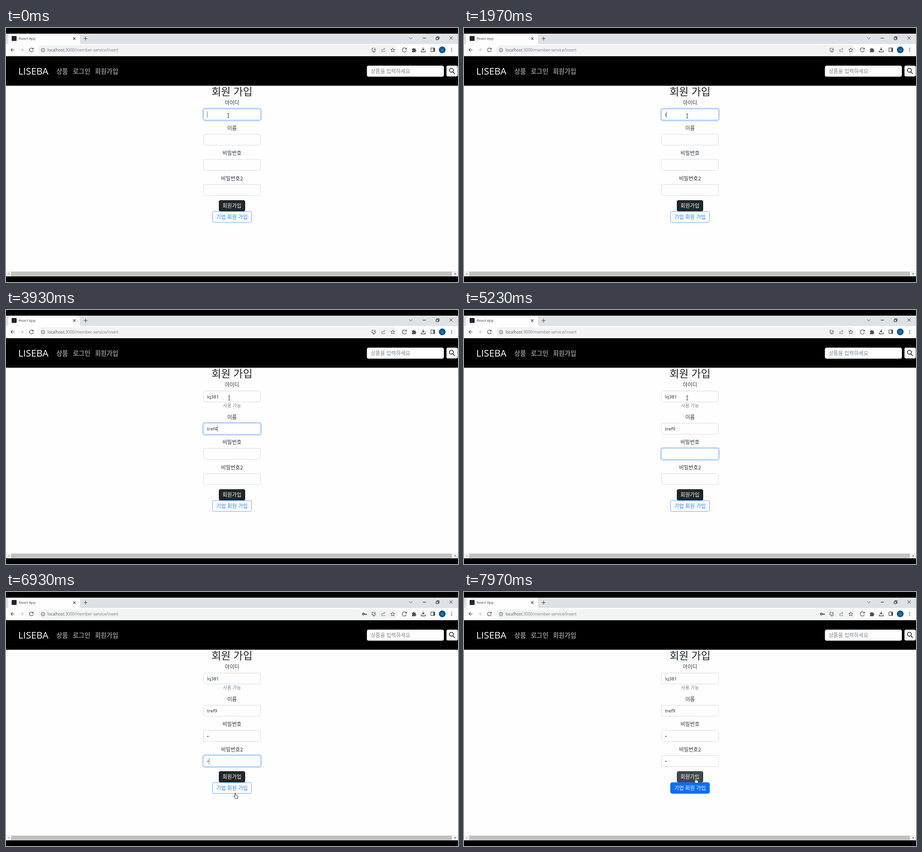
Write an HTML page that moves like this. It is 960 px wide and 540 px high and loops after 8000 ms.

```html
<!DOCTYPE html>
<html lang="ko">
<head>
<meta charset="utf-8">
<title>Sign-up form</title>
<style>
  html, body { margin: 0; width: 100%; height: 100%; overflow: hidden; background: #000; }
  svg { display: block; width: 960px; height: 540px; }
  text { font-family: "Open Sans", "Noto Sans CJK KR", "Noto Sans CJK", sans-serif; white-space: pre; }
  .ko { font-family: "Noto Sans CJK KR", "Noto Sans CJK", sans-serif; }
  .mid { text-anchor: middle; }
  .label { font-size: 11px; fill: #30343a; }
  .value { font-size: 9.8px; fill: #212529; }
  .nav { font-size: 13.4px; font-weight: 700; fill: #8c8c8c; }
  .icon { fill: none; stroke: #4d5054; stroke-width: 1.2; }
  .solid { fill: #4d5054; }
</style>
</head>
<body>
<svg viewBox="0 0 960 540">
  <rect width="960" height="540" fill="#000"/>

  <!-- tab strip -->
  <rect y="12" width="960" height="22" fill="#dee1e6"/>
  <path d="M2 34Q5 34 5 30V17Q5 12 10 12H152Q157 12 157 17V30Q157 34 160 34Z" fill="#fefefe"/>
  <rect x="12" y="17" width="10.5" height="10.5" rx="1" fill="#20252a"/>
  <text x="27" y="25" font-size="7.7" fill="#45484c">React App</text>
  <g class="icon">
    <path d="M142.500 20l5 5m0-5l-5 5M165 22.500h8m-4-4v8"/>
    <path d="M856 20l3.500 3.500 3.500-3.500" stroke-width="1"/>
    <path d="M885 21.500h7M913.500 20h4.800v4.800h-4.800zM915 20v-1.500h5v5h-1.500M942 18l6.500 6.500m0-6.500l-6.500 6.500" stroke="#202124" stroke-width="1"/>
  </g>

  <!-- toolbar -->
  <rect y="34" width="960" height="26" fill="#fefefe"/>
  <rect x="68" y="36.500" width="764" height="20" rx="10" fill="#f1f3f4"/>
  <g class="icon">
    <path d="M18 46.500h-7.500m3.500-3.500l-3.500 3.500 3.500 3.500"/>
    <path d="M29.500 46.500h7.500m-3.500-3.500l3.500 3.500-3.500 3.500" stroke="#c6c8ca"/>
    <path d="M57 44a4 4 0 1 0 .8 3.500M58 42v3h-3"/>
    <circle cx="78.500" cy="47" r="3.800" stroke-width="1"/>
    <path d="M78.500 46.300v2.700m0-4.200v.9" stroke-width="1"/>
    <path d="M781 43h-3.500v6h7.500v-1.500M779 51h4.500M783.500 42v4.500m-2-1.800l2 2 2-2" stroke-width="1"/>
    <path d="M798 45v5.500h6.500v-2M799.500 48q.5-3.500 4.500-3.500m-1.500-2.500l2.800 2.500-2.800 2.500" stroke="#85888c" stroke-width="1"/>
    <path d="M821.500 42.500l1.300 2.900 3 .3-2.300 2 .7 3-2.700-1.600-2.700 1.600.7-3-2.300-2 3-.3z" stroke-width="1"/>
    <path d="M850 44.500a4.500 4.500 0 1 0 .4 3.500M850.500 42v3h-3"/>
    <path d="M886 41.500v5.500m-2.500-2.300l2.500 2.500 2.500-2.500M882 47.500v3.300h8.500v-3.300" stroke-width="1.400"/>
    <rect x="902.500" y="42.500" width="8" height="7.500"/>
  </g>
  <g class="solid">
    <path d="M862 44h2.500a1.500 1.500 0 0 1 3 0h2.500v2.500a1.500 1.500 0 0 1 0 3v2h-8v-2.300a1.500 1.500 0 0 0 0-2.900z"/>
    <rect x="907.500" y="42.500" width="3" height="7.500"/>
    <circle cx="946.500" cy="43.300" r="1"/><circle cx="946.500" cy="46.600" r="1"/><circle cx="946.500" cy="49.900" r="1"/>
  </g>
  <g id="key" class="icon">
    <circle cx="759" cy="46.800" r="1.900" stroke-width="1.700"/>
    <path d="M761 46.800h5m-1.200 0v2" stroke-width="1.700"/>
  </g>
  <circle cx="926.500" cy="46.500" r="7.200" fill="#0c5590"/>
  <text class="ko mid" x="926.500" y="48.600" font-size="5.500" fill="#dfe9f2">나</text>
  <text x="88" y="50" font-size="8.530" fill="#7a7d82"><tspan fill="#55585c">localhost</tspan>:3000/member-service/insert</text>

  <!-- site header -->
  <rect y="122.700" width="960" height="394.300" fill="#fefefe"/>
  <text x="26" y="99" font-size="20.300" fill="#fefefe">LISEBA</text>
  <g class="nav">
    <text class="ko" x="107" y="96.500">상품</text>
    <text class="ko" x="142" y="96.500">로그인</text>
    <text class="ko" x="189" y="96.500">회원가입</text>
  </g>
  <rect x="766.500" y="80" width="163.500" height="23.500" rx="4" fill="#fefefe"/>
  <text class="ko" x="774.500" y="95.700" font-size="11" fill="#7b8288">상품을 입력하세요</text>
  <rect x="935.500" y="80" width="24" height="23" rx="3" fill="#fefefe"/>
  <g fill="none" stroke="#111" stroke-width="1.400"><circle cx="946" cy="89.800" r="4.200"/><path d="M949 93l4 4.500"/></g>

  <!-- horizontal scrollbar -->
  <rect y="517" width="960" height="11" fill="#f1f1f1"/>
  <rect x="11" y="518" width="936" height="9.500" fill="#c1c1c1"/>
  <path d="M7 520.500v4l-2.500-2z" fill="#a3a3a3"/>
  <path d="M953 520.500v4l2.500-2z" fill="#505050"/>

  <!-- form -->
  <text class="ko mid" x="480" y="143" font-size="22" fill="#212529">회원 가입</text>
  <text class="ko mid" id="hint" x="480" y="206.700" font-size="9.700" fill="#7b8288">사용 가능</text>
  <g id="first"></g>
  <g id="rest">
    <rect id="dark" x="452" y="366" width="56" height="24" rx="4"/>
    <text class="ko mid" x="480" y="382" font-size="11" fill="#fefefe">회원가입</text>
    <rect id="blue" x="438.400" y="390" width="83.200" height="23.300" rx="4" stroke-width=".8"/>
    <text class="ko mid" id="blueText" x="480" y="405.800" font-size="11">기업 회원 가입</text>
  </g>

  <!-- pointers -->
  <g id="pointer">
    <path id="beam" d="M-2-4.500H-.6L0-4 .6-4.500H2M0-4V4M-2 4.500H-.6L0 4 .6 4.500H2" fill="none" stroke="#333"/>
    <path id="arrow" d="M0 0V11l2.500-2.400 1.600 3.700 1.700-.7-1.600-3.600h3.500z" fill="#fff" stroke="#111" stroke-width=".8"/>
    <path id="hand" d="M-1 1a1 1 0 0 1 2 0v3.800l3.800 1q1.200.4 1 1.700l-.8 4H0L-3 7.200q-.2-1.700 2 0z" fill="#fff" stroke="#222" stroke-width=".9"/>
  </g>
</svg>
<script>
const LOOP = 8000, FADE = 150, BLINK = 530, SHIFT = 15, SHIFT_AT = 2770;
const WHITE = [254, 254, 254], BLUE = [13, 110, 253];
const $ = id => document.getElementById(id);

function add(parent, tag, attrs, text = "") {
  const node = document.createElementNS("http://www.w3.org/2000/svg", tag);
  for (const k in attrs) node.setAttribute(k, attrs[k]);
  node.textContent = text;
  parent.append(node);
  return node;
}

// keys: [time, value] pairs; on/off: focus interval
const fields = [
  { label: "아이디", y: 172, on: -1000, off: 2700,
    keys: [[1970, "l"], [2130, "lq"], [2270, "lq3"], [2400, "lq38"], [2530, "lq381"]] },
  { label: "이름", y: 225.500, on: 2700, off: 4700,
    keys: [[2960, "t"], [3100, "tr"], [3230, "tre"], [3370, "tref"], [3530, "tref4"], [4030, "tref"], [4230, "tref9"]] },
  { label: "비밀번호", y: 279, on: 4700, off: 5670, keys: [[5570, "•"]] },
  { label: "비밀번호2", y: 332.500, on: 5670, off: 7400, keys: [[5800, "•"]] }
];

fields.forEach((f, i) => {
  const g = $(i ? "rest" : "first");
  add(g, "text", { class: "ko mid label", x: 480, y: f.y - 9 }, f.label);
  f.ring = add(g, "rect", { x: 417.800, y: f.y - 1.300, width: 124.400, height: 26.400, rx: 5, fill: "none", stroke: "#c2dbfe", "stroke-width": 2.600 });
  f.box = add(g, "rect", { x: 419.300, y: f.y + .2, width: 121.400, height: 23.400, rx: 4, fill: "#fefefe", "stroke-width": .8 });
  f.text = add(g, "text", { class: "value", x: 427, y: f.y + 15.700 });
  f.caret = add(g, "rect", { y: f.y + 5.500, width: .8, height: 13, fill: "#44484e" });
});

const clamp = v => Math.max(0, Math.min(1, v));
const smooth = v => { v = clamp(v); return v * v * (3 - 2 * v); };
const fade = (t, start) => smooth((t - start) / FADE);
const mix = (a, b, k) => `rgb(${a.map((v, i) => Math.round(v + (b[i] - v) * k))})`;
const show = (node, on) => node.setAttribute("visibility", on ? "visible" : "hidden");

// hot spot of the pointer: time, x, y
const path = [
  [0, 472, 186], [1499, 472, 186], [1500, 473, 191], [1529, 473, 191], [1530, 474, 187],
  [6100, 474, 187], [6750, 485, 441], [6830, 485, 441], [6930, 487, 427.500],
  [7250, 489, 418], [7600, 490, 412], [7820, 492, 395], [LOOP, 492, 395]
];

function pointerAt(t) {
  const i = Math.max(1, path.findIndex(p => p[0] > t));
  const [a, b] = [path[i - 1], path[i]];
  const k = smooth((t - a[0]) / (b[0] - a[0]));
  return [a[1] + (b[1] - a[1]) * k, a[2] + (b[2] - a[2]) * k];
}

function drawField(f, t) {
  const past = f.keys.filter(k => k[0] <= t);
  const value = past.length ? past[past.length - 1][1] : "";
  if (f.text.textContent !== value) f.text.textContent = value;

  const glow = fade(t, f.on) - fade(t, f.off);
  f.ring.setAttribute("opacity", glow);
  f.box.setAttribute("stroke", mix([206, 212, 218], [134, 183, 254], glow));

  const last = past.length ? past[past.length - 1][0] : f.on < 0 ? -390 : f.on;
  const lit = Math.floor((t - last) / BLINK) % 2 === 0;
  show(f.caret, t >= f.on && t < f.off && lit);
  f.caret.setAttribute("x", 427.200 + (value ? f.text.getComputedTextLength() : 0));
}

function drawPointer(t, shift) {
  const [x, y] = pointerAt(t);
  const button = y > 366 + shift && y < 413.300 + shift;
  const input = fields.some((f, i) => {
    const top = f.y + (i ? shift : 0);
    return y > top - 18 && y < top + 24;
  });
  show($("hand"), button);
  show($("beam"), input && !button);
  show($("arrow"), !input && !button);
  $("pointer").setAttribute("transform", `translate(${x} ${y})`);
}

function draw(t) {
  const shift = t >= SHIFT_AT ? SHIFT : 0;
  $("rest").setAttribute("transform", `translate(0 ${shift})`);
  show($("hint"), shift);
  show($("key"), t >= 6000);
  fields.forEach(f => drawField(f, t));

  $("dark").setAttribute("fill", mix([33, 37, 41], [66, 70, 73], fade(t, 7700)));
  const hover = fade(t, 6930);
  $("blue").setAttribute("fill", mix(WHITE, BLUE, hover));
  $("blue").setAttribute("stroke", mix([70, 145, 253], BLUE, hover));
  $("blueText").setAttribute("fill", mix([45, 125, 240], WHITE, hover));
  drawPointer(t, shift);
}

const begin = performance.now();
function tick() {
  draw((performance.now() - begin) % LOOP);
  requestAnimationFrame(tick);
}
tick();
</script>
</body>
</html>
```
